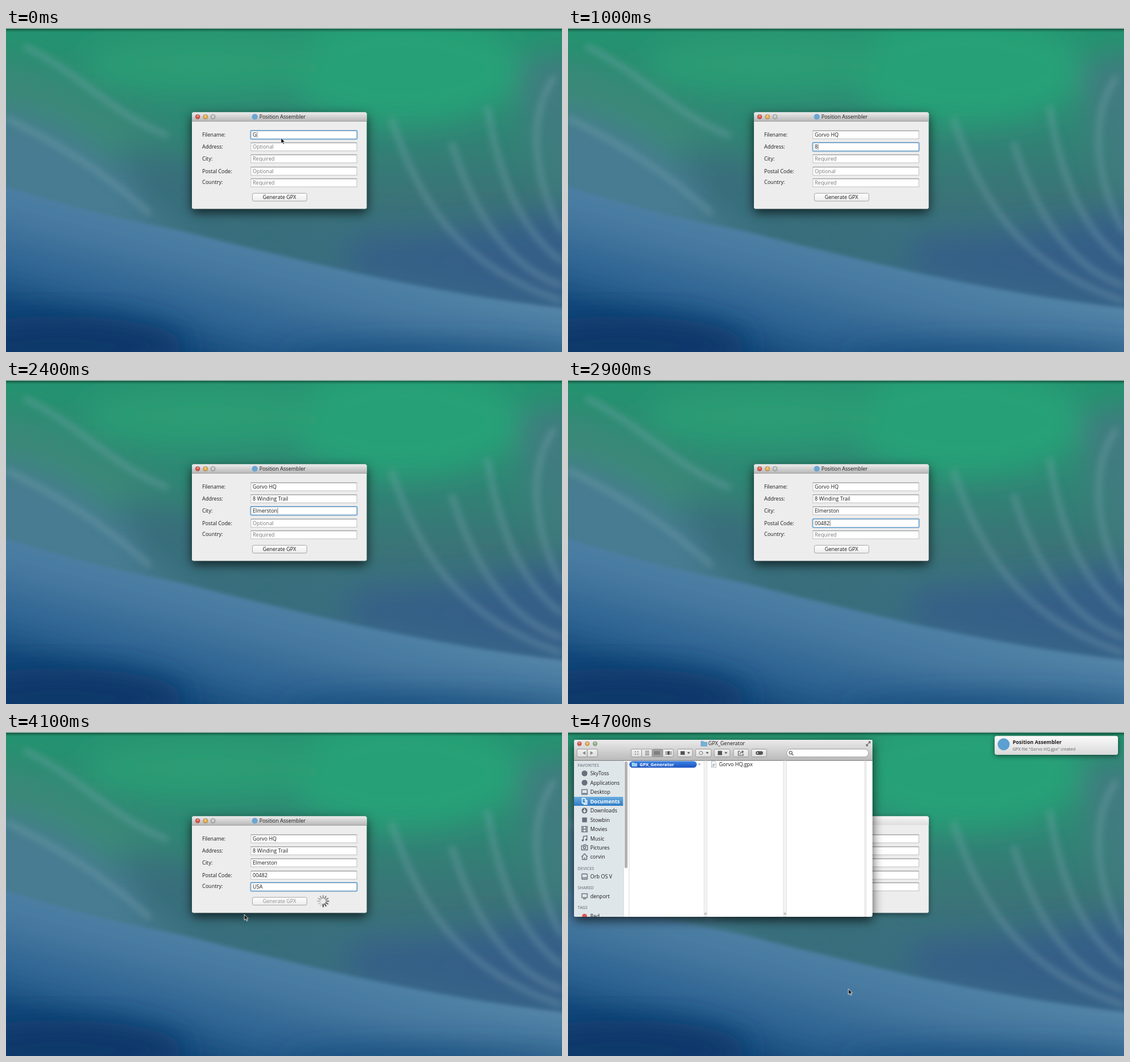
Recreate the animation shown at these times as an HTML page. Size 924x540 px, loop 4.8 s.

```html
<!DOCTYPE html>
<html lang="en">
<head>
<meta charset="utf-8">
<title>Position Assembler</title>
<style>
  html, body { margin: 0; width: 100%; height: 100%; overflow: hidden; background: #1f6a80; }
  svg { position: absolute; left: 0; top: 0; width: 924px; height: 540px; }
  text { font: 8.6px "Open Sans", "Noto Sans", sans-serif; fill: #1c1c1c; white-space: pre; }
  .bold { font-weight: 700; }
  .white { fill: #fff; }
  .head { font-size: 6.9px; font-weight: 600; fill: #7a828b; }
  .hint { fill: #777; }
  .small { font-size: 7px; fill: #666; }
  .shadow { filter: drop-shadow(0 6px 9px rgba(0, 0, 0, .7)); }
  .soft { filter: drop-shadow(0 2px 4px rgba(0, 0, 0, .5)); }
  .icon { fill: none; stroke: #68717b; stroke-width: 1.3; }
  .icon .fill { fill: #68717b; stroke: none; }
  .picked .icon { stroke: #fff; }
  .tool { fill: none; stroke: #555; stroke-width: 1.1; }

  .before, .after, .busy, .label { animation: 4.8s step-end infinite; }
  .before { animation-name: before; }
  .after { animation-name: after; }
  .busy { animation-name: busy; }
  .label { animation-name: dim; }
  .pointer { animation: 4.8s linear infinite travel; }
  .banner { animation: 4.8s linear infinite slide; }
  .spin { animation: 1.2s steps(12) infinite spin; }

  @keyframes before { 0% { visibility: visible } 87.4%, 100% { visibility: hidden } }
  @keyframes after { 0% { visibility: hidden } 87.4%, 100% { visibility: visible } }
  @keyframes busy { 0% { visibility: hidden } 77% { visibility: visible } 87.4%, 100% { visibility: hidden } }
  @keyframes dim { 0% { fill: #1c1c1c } 77%, 100% { fill: #8f8f8f } }
  @keyframes spin { to { transform: rotate(360deg) } }
  @keyframes slide {
    0%, 91.5% { transform: translateX(225px) }
    95%, 100% { transform: none }
  }
  @keyframes travel {
    0%, 2% { transform: translate(457px, 183px); opacity: 1 }
    2.01%, 70.8% { transform: translate(457px, 183px); opacity: 0 }
    70.81% { transform: translate(457px, 183px); opacity: 1 }
    75%, 77% { transform: translate(460px, 280px) }
    84.4%, 89.6% { transform: translate(396px, 304px) }
    97%, 100% { transform: translate(466px, 428px); opacity: 1 }
  }
</style>
</head>
<body>

<!-- Wallpaper -->
<svg viewBox="0 0 924 540">
  <defs>
    <linearGradient id="sea" x1="0" y1="0" x2="0" y2="1">
      <stop offset="0" stop-color="#24936f"/>
      <stop offset=".3" stop-color="#2f8674"/>
      <stop offset=".52" stop-color="#3a7377"/>
      <stop offset=".8" stop-color="#39698a"/>
    </linearGradient>
    <linearGradient id="swell" gradientUnits="userSpaceOnUse" x1="440" y1="330" x2="380" y2="560">
      <stop offset="0" stop-color="#5586a9"/>
      <stop offset=".4" stop-color="#45789f"/>
      <stop offset=".75" stop-color="#2c6291"/>
      <stop offset="1" stop-color="#154a7b"/>
    </linearGradient>
    <linearGradient id="rim" x1="0" y1="0" x2="0" y2="1">
      <stop offset="0" stop-color="#000" stop-opacity=".45"/>
      <stop offset="1" stop-color="#000" stop-opacity="0"/>
    </linearGradient>
    <filter id="blur" x="-40%" y="-40%" width="180%" height="180%"><feGaussianBlur stdDeviation="24"/></filter>
    <filter id="edge"><feGaussianBlur stdDeviation="3"/></filter>
    <filter id="haze" x="-20%" y="-20%" width="140%" height="140%"><feGaussianBlur stdDeviation="6"/></filter>
  </defs>
  <rect width="924" height="540" fill="url(#sea)"/>
  <g filter="url(#blur)">
    <ellipse cx="660" cy="70" rx="200" ry="90" fill="#27a177"/>
    <ellipse cx="330" cy="60" rx="200" ry="50" fill="#2a9c74"/>
    <path d="M-40 50C60 60 160 110 260 190L200 220 -40 130Z" fill="#3a8878"/>
    <path d="M-40 130C110 155 190 220 310 350H-40Z" fill="#477b92"/>
    <path d="M190 190C330 230 450 310 640 420L400 385 230 310Z" fill="#396e7c"/>
    <path d="M590 350C700 360 850 330 960 290V480L560 400Z" fill="#365f87"/>
    <path d="M850 60C865 160 880 260 960 330V40Z" fill="#3f7b80"/>
  </g>
  <g filter="url(#haze)" fill="none" stroke="#82a9b6" stroke-width="9" opacity=".4">
    <path d="M30 30C130 80 170 140 270 180"/>
    <path d="M640 150C690 300 760 400 924 455"/>
    <path d="M740 190C780 320 840 400 924 430"/>
    <path d="M800 130C820 260 860 340 924 390"/>
    <path d="M912 80C870 140 870 240 924 340"/>
    <path d="M0 150C80 190 150 230 240 310"/>
  </g>
  <path d="M-10 262C110 300 190 318 290 338C480 385 690 440 934 468V550H-10Z" fill="url(#swell)" filter="url(#edge)"/>
  <g filter="url(#blur)" fill="#08396a">
    <ellipse cx="90" cy="530" rx="210" ry="50"/>
    <ellipse cx="720" cy="548" rx="260" ry="24" opacity=".6"/>
  </g>
  <rect width="924" height="7" fill="url(#rim)"/>
  <rect width="924" height="1" fill="#cfd6d3"/>
</svg>

<!-- Windows -->
<svg viewBox="0 0 924 540">
  <defs>
    <linearGradient id="bar" x1="0" y1="0" x2="0" y2="1">
      <stop offset="0" stop-color="#ebebeb"/><stop offset="1" stop-color="#b9b9b9"/>
    </linearGradient>
    <linearGradient id="idle" x1="0" y1="0" x2="0" y2="1">
      <stop offset="0" stop-color="#f6f6f6"/><stop offset="1" stop-color="#dedede"/>
    </linearGradient>
    <linearGradient id="push" x1="0" y1="0" x2="0" y2="1">
      <stop offset="0" stop-color="#fff"/><stop offset="1" stop-color="#ececec"/>
    </linearGradient>
    <linearGradient id="pick" x1="0" y1="0" x2="0" y2="1">
      <stop offset="0" stop-color="#69ade0"/><stop offset="1" stop-color="#2f7cc4"/>
    </linearGradient>
    <linearGradient id="pill" x1="0" y1="0" x2="0" y2="1">
      <stop offset="0" stop-color="#3f85e4"/><stop offset="1" stop-color="#1a52c0"/>
    </linearGradient>
    <linearGradient id="note" x1="0" y1="0" x2="0" y2="1">
      <stop offset="0" stop-color="#fbfbfb"/><stop offset="1" stop-color="#d9d9d9"/>
    </linearGradient>
    <clipPath id="pane"><rect x="10" y="13" width="496" height="295" rx="3"/></clipPath>
  </defs>

  <g id="form">
    <rect class="before shadow" x="309" y="140.5" width="290.5" height="161" rx="3" fill="#ededed"/>
    <rect class="after soft" x="309" y="140.5" width="290.5" height="161" rx="3" fill="#ededed"/>
    <path class="after" d="M309 155V143.500Q309 140.500 312 140.500H596.500Q599.500 140.500 599.500 143.500V155Z" fill="url(#idle)"/>
    <g class="before">
      <path d="M309 155V143.500Q309 140.500 312 140.500H596.500Q599.500 140.500 599.500 143.500V155Z" fill="url(#bar)"/>
      <path d="M309 155.5H599.5" stroke="#8e8e8e" stroke-width=".8"/>
      <g id="formLights"></g>
      <circle cx="413.5" cy="148" r="4.8" fill="#6ba6d3"/>
      <text x="421" y="151">Position Assembler</text>
    </g>
    <g id="fields"></g>
    <g class="before">
      <rect id="ring" x="406.5" width="177" height="14.5" rx="1.5" fill="none" stroke="#7aabd2" stroke-width="1.8"/>
      <rect id="caret" width=".7" height="9.5" fill="#444"/>
      <rect x="409.5" y="275.5" width="90.5" height="13" rx="2.5" fill="url(#push)" stroke="#a2a2a2" stroke-width=".9"/>
      <text class="label" x="454.5" y="284.5" text-anchor="middle">Generate GPX</text>
    </g>
    <g class="busy" transform="translate(527 282)"><g class="spin" id="spokes"></g></g>
  </g>

  <g class="after">
    <rect class="shadow" x="10" y="13" width="496" height="295" rx="3" fill="#fff"/>
    <g clip-path="url(#pane)">
      <rect x="10" y="13" width="496" height="34.5" fill="url(#bar)"/>
      <path d="M10 47.5H506" stroke="#808080"/>
      <rect x="10" y="48" width="82" height="260" fill="#dfe6ea"/>
      <rect x="94" y="49" width="5" height="178" rx="2.5" fill="#b4b4b4"/>
      <path d="M92.5 48V308M101.5 48V308" stroke="#d2d2d2" stroke-width=".8"/>
      <g id="dividers"></g>
      <g id="sidebar"></g>
      <rect x="102" y="48.5" width="112" height="11" rx="5.5" fill="url(#pill)"/>
      <path d="M106 51H109.5L110.5 52H115V57.5H106Z" fill="#9dd0f2"/>
      <text class="bold white" x="119" y="57" style="font-size:7.6px">GPX_Generator</text>
      <path d="M217 51.5L221 53.8 217 56Z" fill="#b5b5b5"/>
      <path d="M238.5 49H243.5L246 51.5V59H238.5Z" fill="#fff" stroke="#999" stroke-width=".7"/>
      <path d="M240 54H244.5M240 56.5H243" stroke="#5580a8"/>
      <text x="251" y="57">Gorvo HQ.gpx</text>
      <g id="finderLights"></g>
      <path d="M221 15.5H225L226 17H231V23.5H221Z" fill="#74b2d9" stroke="#5186ab" stroke-width=".5"/>
      <text x="233" y="22.3">GPX_Generator</text>
      <path class="tool" d="M496 23L502 16M499 16H502V19M496 20V23H499"/>
      <g id="buttons"></g>
      <path d="M29 32V38L24 35ZM37 32V38L42 35Z" fill="#8a8a8a"/>
      <path class="tool" d="M111 33H113M115 33H117M111 37H113M115 37H117M128 32H135M128 35H135M128 38H135M144 32V38M146.5 32V38M149 32V38M151.5 32V38M163 32V38M171 32V38"/>
      <path d="M165 32H169V38H165ZM187 32H194V38H187Z" fill="#555"/>
      <circle class="tool" cx="221" cy="35" r="2.8" stroke-dasharray="1.4 .8" stroke-width="2"/>
      <rect x="249" y="31.5" width="7" height="7" fill="#555"/>
      <path d="M198 33.5H203L200.5 36.5ZM229 33.5H234L231.5 36.5ZM260 33.5H265L262.5 36.5Z" fill="#555"/>
      <path class="tool" d="M286 32H283V39H291V36M286 37Q286 33 291 33M289 31L291.5 33 289 35"/>
      <rect x="312" y="32" width="12" height="6" rx="3" fill="#555"/>
      <circle cx="315" cy="35" r="1.2" fill="#ddd"/>
      <rect x="363.5" y="28.5" width="136" height="13" rx="6.5" fill="#fff" stroke="#999" stroke-width=".9"/>
      <circle class="tool" cx="370" cy="34.5" r="2.5"/><path class="tool" d="M372 36.5L374.5 39"/>
    </g>
    <g class="banner">
      <rect class="soft" x="709" y="6.5" width="205" height="31.5" rx="3.5" fill="url(#note)"/>
      <circle cx="724" cy="20.5" r="10" fill="#5c9fd0"/>
      <text class="bold" x="739" y="19.5" style="font-size:8.5px">Position Assembler</text>
      <text class="small" x="739" y="31">GPX file "Gorvo HQ.gpx" created</text>
    </g>
  </g>

  <path class="pointer" d="M0 0V9.5L2.2 7.5 3.8 11 5.4 10.3 3.8 7H6.6Z" fill="#111" stroke="#fff" stroke-width=".8"/>
</svg>

<script>
const $ = id => document.getElementById(id);
const repeat = (id, list, draw) => { $(id).innerHTML = list.map(draw).join(''); };
const LOOP = 4800;

const light = (y, r) => ([x, color]) =>
  `<circle cx="${x}" cy="${y}" r="${r}" fill="${color}" stroke="#0006" stroke-width=".7"/>
   <ellipse cx="${x}" cy="${y - 1.6}" rx="1.8" ry="1" fill="#fff" opacity=".55"/>`;
repeat('formLights', [[318.5, '#e2574e'], [331.5, '#efb14b'], [344, '#c4c4c4']], light(148, 3.7));
repeat('finderLights', [[19, '#e2574e'], [32, '#efb14b'], [45, '#8fb98a']], light(19.5, 3.4));

// Form: focus is the moment a field is entered, from and to bound its typing
const fields = [
  { name: 'Filename:', y: 178, hint: 'Required', value: 'Gorvo HQ', focus: 0, from: 0, to: 700 },
  { name: 'Address:', y: 198, hint: 'Optional', value: '8 Winding Trail', focus: 890, from: 950, to: 1750 },
  { name: 'City:', y: 218, hint: 'Required', value: 'Elmerston', focus: 1890, from: 1980, to: 2390 },
  { name: 'Postal Code:', y: 238.5, hint: 'Optional', value: '00482', focus: 2490, from: 2550, to: 2850 },
  { name: 'Country:', y: 258, hint: 'Required', value: 'USA', focus: 2990, from: 3090, to: 3290 }
];
repeat('fields', fields, (f, i) =>
  `<text x="326" y="${f.y + (i === 4 ? 2.3 : 3)}">${f.name}</text>
   <rect x="407" y="${f.y - 6.7}" width="176" height="13.5" fill="#fff" stroke="#bdbdbd" stroke-width=".9"/>
   <path d="M407 ${f.y - 6.7}H583" stroke="#8f8f8f" stroke-width=".9"/>
   <text class="value before" x="410" y="${f.y + 3.3}"></text>`);
const values = [...document.querySelectorAll('.value')];

repeat('spokes', [...Array(12).keys()], i =>
  `<path d="M5.2 0H9.3" transform="rotate(${-60 - 30 * i})" stroke="#222" stroke-width="1.7"
    stroke-linecap="round" opacity="${1 - i * .077}"/>`);

// File browser
repeat('dividers', [[226, 5], [358, 5], [493, 2.5]], ([x, w]) =>
  `<rect x="${x}" y="48" width="${w}" height="260" fill="#f4f4f4" stroke="#d4d4d4" stroke-width=".7"/>
   ${w > 3 ? `<path d="M${x + 1.7} 301V305M${x + 3.4} 301V305" stroke="#888" stroke-width=".7"/>` : ''}`);

const viewButtons = [105, 122.5, 140, 157.5].map(x => [x, 17.5]);
repeat('buttons', [[15, 17], [32, 17], ...viewButtons, [182, 25], [212, 26], [243, 26], [275, 25], [305, 25]], ([x, w]) =>
  `<rect x="${x}" y="28.5" width="${w}" height="13" rx="2" fill="${x === 140 ? '#a2a2a2' : 'url(#push)'}"
    fill-opacity="${x === 140 ? 1 : .65}" stroke="#8c8c8c" stroke-width=".8"/>`);

const dot = '<circle class="fill" r="4.8"/>';
const disk = '<rect x="-4.5" y="-4.5" width="9" height="9" rx="1"/><path d="M-4 2H4"/>';
const items = [
  ['SkyToss', 69, dot],
  ['Applications', 84.5, dot],
  ['Desktop', 100, '<rect x="-4.5" y="-4" width="9" height="8"/><path d="M-4 2.5H4"/>'],
  ['Documents', 115.5, '<path d="M-4 -5H0L2 -3V3H-4ZM0 -1H4V5H-1V3"/>'],
  ['Downloads', 131, dot + '<path d="M0 -3V2M-2.2 0L0 2.5 2.2 0" stroke="#fff"/>'],
  ['Stowbin', 146.5, '<rect class="fill" x="-4" y="-4" width="8" height="8"/>'],
  ['Movies', 162, '<rect x="-4.5" y="-4.5" width="9" height="9"/><path d="M-2.5 -4V4M2.5 -4V4M-2.5 0H2.5"/>'],
  ['Music', 177.5, '<path d="M-2 3V-3.5L4 -4.5V2"/><circle class="fill" cx="-3" cy="3" r="1.8"/><circle class="fill" cx="3" cy="2" r="1.8"/>'],
  ['Pictures', 192.5, '<path d="M-5 -3H-2L-1 -4.5H2L3 -3H5V4H-5Z"/><circle r="2"/>'],
  ['corvin', 208, '<path d="M-5 0L0 -5 5 0M-3.5 -1V4.5H3.5V-1M0 4.5V1"/>'],
  ['Orb OS V', 241, disk],
  ['denport', 273.5, '<rect x="-4.5" y="-4" width="9" height="6.5"/><path d="M-2.5 4.5H2.5"/>'],
  ['Red', 307, '<circle r="4" fill="#e0564c" stroke="none"/>']
];
const heads = [['FAVORITES', 58], ['DEVICES', 229.5], ['SHARED', 262], ['TAGS', 295]];
repeat('sidebar', [...heads, ...items], ([name, y, icon]) => {
  if (!icon) return `<text class="head" x="16" y="${y}">${name}</text>`;
  const picked = name === 'Documents';
  return `<g class="${picked ? 'picked' : ''}">
    ${picked ? '<rect x="10" y="108" width="81.5" height="15" fill="url(#pick)"/>' : ''}
    <g class="icon" transform="translate(27.5 ${y})">${icon}</g>
    <text class="${picked ? 'bold white' : ''}" x="37" y="${y + 3.2}">${name}</text></g>`;
});

function typed({ value, from, to }, t) {
  if (t < from) return '';
  const part = Math.min(1, (t - from) / (to - from));
  return value.slice(0, 1 + Math.floor(part * (value.length - 1)));
}

function render(t) {
  let current = 0;
  fields.forEach((f, i) => {
    const text = typed(f, t);
    values[i].textContent = text || f.hint;
    values[i].classList.toggle('hint', !text);
    if (t >= f.focus) current = i;
  });
  const f = fields[current];
  const width = typed(f, t) ? values[current].getComputedTextLength() : 0;
  $('ring').setAttribute('y', f.y - 7.2);
  $('caret').setAttribute('x', 410.5 + width);
  $('caret').setAttribute('y', f.y - 4.7);
  $('caret').setAttribute('opacity', t < 3500 ? 1 : 0);
}

let start;
function tick(now) {
  start ??= now;
  render((now - start) % LOOP);
  requestAnimationFrame(tick);
}
render(0);
requestAnimationFrame(tick);
</script>
</body>
</html>
```
